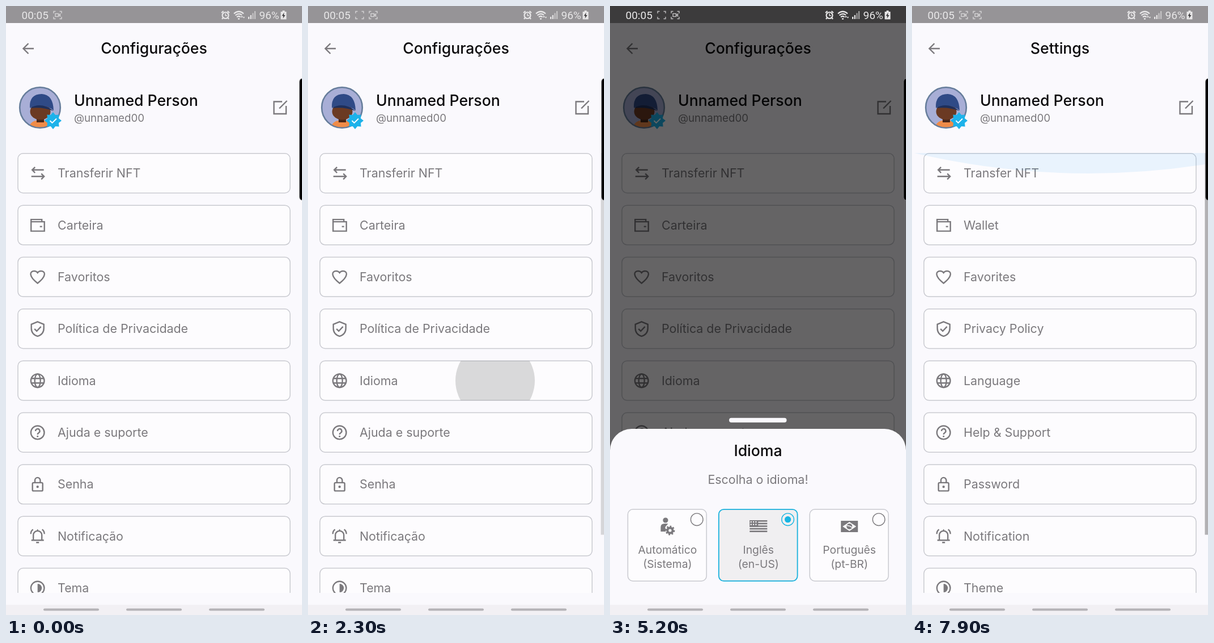
These frames come from a looping animation (522 by 1073 pixels, 8 s). An HTML page:

```html
<!DOCTYPE html>
<html lang="pt">
<head>
<meta charset="utf-8">
<title>Settings screen</title>
<style>
  html, body { margin: 0; width: 100%; height: 100%; overflow: hidden; background: #faf9fd; }
  svg { display: block; width: 100vw; height: 100vh; }
  text { font-family: Inter, "Open Sans", sans-serif; font-size: 21.4px; fill: #7b797d; }
  .title { font-size: 26.6px; font-weight: 500; fill: #0b0a0c; }
  .handle { font-size: 18.7px; }
  .small { font-size: 19.3px; }
  .mid { text-anchor: middle; }
  .line { fill: none; stroke: #7b797d; stroke-width: 2.4; }
  .solid { fill: #7b797d; stroke: none; }
  .box { fill: #fdfcfe; stroke: #c9cad0; stroke-width: 1.5; }
  .status text { font-family: Roboto, sans-serif; font-size: 19px; fill: #e8e7e8; }
  .status .thin { fill: none; stroke: #e8e7e8; stroke-width: 1.4; }
  .status .bold { fill: none; stroke: #e8e7e8; stroke-width: 2.2; }
  .status .full { fill: #e8e7e8; }
  .card circle { fill: none; stroke: #7b797d; stroke-width: 1.4; }
  .card .head { fill: #7b797d; stroke: none; }
  .card .dot { display: none; }
  .card.on .box { stroke: #18b5e2; stroke-width: 1.8; }
  .card.on .ring { stroke: #18b5e2; }
  .card.on .dot { display: block; fill: #18b5e2; stroke: none; }
  .pt .en, .en .pt { display: none; }
</style>
</head>
<body>
<script>
const LOOP = 8000, STEP = 100;
const VIEW = { top: 259, bottom: 1034, extra: 118 };
const PITCH = 91.35;

const ICONS = {
  transfer: '<path d="M11-6H-9M-4.5-11L-9.5-6L-4.5-1M-11 5.5H11M6.5.5L11.5 5.5L6.5 10.5"/>',
  wallet: '<path d="M7.5-6V-10H-11.5V10.5H12V-6H-11.5M4 2.5H8"/>',
  heart: '<path d="M0 11C-16.5-2-14-10.5-6-10.5C-3-10.5-1-9 0-7.5C1-9 3-10.5 6-10.5C14-10.5 16.5-2 0 11Z"/>',
  shield: '<path d="M0-12.5L11-8V-1C11 6 7 11 0 13C-7 11-11 6-11-1V-8ZM-5.5 0L-1.5 4L6-4"/>',
  globe: '<circle r="11.8"/><ellipse rx="5" ry="11.8"/><path d="M-11-4H11M-11 4H11"/>',
  help: '<circle r="11.8"/><path d="M-3.6-2.6a3.7 3.7 0 1 1 5.6 3c-1.4.9-2 1.5-2 3"/><circle class="solid" cy="6.6" r="1.5"/>',
  lock: '<rect x="-9" y="-3" width="18" height="14.5" rx="2"/><path d="M-4.7-3V-7.3a4.7 4.7 0 0 1 9.4 0V-3"/><circle class="solid" cy="4.2" r="2.2"/>',
  bell: '<path d="M-7.5 7V-2a7.5 7.5 0 0 1 15 0V7M-11 7H11M-2.5 11H2.5M0-12V-9M-12-4C-12-7-11-10-8-12M12-4C12-7 11-10 8-12"/>',
  theme: '<circle r="11.8"/><path class="solid" d="M0-7.5a7.5 7.5 0 0 1 0 15z"/>',
  logout: '<path d="M6-7V-11.5H-9V11.5H6V7M-2 0H12M8-4.5L12.5 0L8 4.5"/>'
};

const ITEMS = [
  ['transfer', 'Transferir NFT', 'Transfer NFT'],
  ['wallet', 'Carteira', 'Wallet'],
  ['heart', 'Favoritos', 'Favorites'],
  ['shield', 'Política de Privacidade', 'Privacy Policy'],
  ['globe', 'Idioma', 'Language'],
  ['help', 'Ajuda e suporte', 'Help &amp; Support'],
  ['lock', 'Senha', 'Password'],
  ['bell', 'Notificação', 'Notification'],
  ['theme', 'Tema', 'Theme'],
  ['logout', 'Sair', 'Logout']
];

const stripes = [0, 1, 2, 3, 4].map(i => `<rect class="solid" x="-15.5" y="${-11 + i * 4.6}" width="31" height="2.6"/>`).join('');
const stars = [0, 1, 2, 3, 4, 5].map(i => `<circle style="fill:#fdfcfe;stroke:none" cx="${-13 + i % 3 * 4.3}" cy="${i < 3 ? -8 : -3.5}" r="1.2"/>`).join('');
const CARDS = [
  ['Automático', 'Automatic', '(Sistema)', '(System)',
    `<circle class="head" cx="-3.5" cy="-11" r="4.6"/><path class="solid" d="M-12 9V1Q-12-5-5-5H1L-4 1L-3 9Z"/>
     <g transform="translate(4.5 7)"><circle style="stroke-width:4" r="4.6"/><circle style="stroke-width:3;stroke-dasharray:2.7" r="7"/></g>`],
  ['Inglês', 'English', '(en-US)', '(en-US)',
    `${stripes}<rect class="solid" x="-15.5" y="-11" width="15" height="11.800"/>${stars}`],
  ['Português', 'Portuguese', '(pt-BR)', '(pt-BR)',
    `<rect class="solid" x="-15" y="-10" width="30" height="20"/><path fill="#fdfcfe" d="M0-8L12 0L0 8L-12 0Z"/>
     <circle class="head" r="5"/><path d="M-4.5-1.5Q1-1.5 4.5 2" fill="none" stroke="#fdfcfe" stroke-width="1.4"/>`]
];

const label = (x, y, pt, en, cls = '') =>
  `<text x="${x}" y="${y}" class="pt ${cls}">${pt}</text><text x="${x}" y="${y}" class="en ${cls}">${en}</text>`;

const item = ([icon, pt, en], i) => `
  <g transform="translate(0 ${VIEW.top + 0.8 + i * PITCH})">
    <rect class="box" x="21" width="480" height="69.6" rx="9"/>
    <g clip-path="url(#itemClip)"><circle id="press${i}" cy="35" r="0"/></g>
    <g class="line" transform="translate(55.7 35)">${ICONS[icon]}</g>
    ${label(91, 42.5, pt, en)}
  </g>`;

const card = ([pt, en, pt2, en2, icon], i) => `
  <g class="card" id="card${i}" transform="translate(${31.4 + i * 160.4} 886.8)">
    <rect class="box" width="138.8" height="126.4" rx="9"/>
    <rect id="tint${i}" width="138.8" height="126.4" rx="9" opacity="0"/>
    <g transform="translate(70 30.2)">${icon}</g>
    <circle class="ring" cx="121.8" cy="17.9" r="10.8"/><circle class="dot" cx="121.8" cy="17.9" r="5.6"/>
    ${label(70, 78.2, pt, en, 'small mid')}${label(70, 103.2, pt2, en2, 'small mid')}
  </g>`;

const badge = Array.from({ length: 16 }, (_, i) => {
  const r = i % 2 ? 10.8 : 15, a = i * Math.PI / 8;
  return `${(83 + r * Math.cos(a)).toFixed(1)},${(202 + r * Math.sin(a)).toFixed(1)}`;
}).join(' ');

const recorder = (x, id) => `
  <g id="${id}" transform="translate(${x} 16)" opacity=".75">
    <path class="thin" d="M-7-3V-6.5H-3.500M3.500-6.5H7V-3M7 3V6.5H3.500M-3.500 6.5H-7V3"/>
    <path class="thin cam" d="M-4-2.5H1.5V2.5H-4ZM1.5 0L4.5-2V2Z"/>
  </g>`;

const avatar = `
  <g clip-path="url(#avatarClip)">
    <rect x="22" y="141" width="76" height="76" fill="#a8aed6"/>
    <path d="M40 220Q40 201 60 201Q80 201 80 220Z" fill="#f08c48"/>
    <rect x="54" y="196" width="13" height="9" fill="#4a2718"/>
    <ellipse cx="60.500" cy="186" rx="18" ry="14.500" fill="#6b3a23"/>
    <path d="M42 179Q41 155 63 155Q83 156 84 184Q68 171 42 179Z" fill="#2f4a86"/>
    <path d="M42 180Q62 168 84 185Q64 177 42 180Z" fill="#1d2f5c"/>
  </g>
  <circle cx="60" cy="179" r="35.800" fill="none" stroke="#667d9b" stroke-width="2.6"/>
  <polygon points="${badge}" fill="#1db2ea"/>
  <path d="M77.5 202L81.5 206L89 198.5" fill="none" stroke="#fff" stroke-width="1.8"/>`;

document.body.innerHTML = `
<svg id="stage" class="pt" viewBox="0 0 522 1073" preserveAspectRatio="none">
  <defs>
    <clipPath id="listClip"><rect y="${VIEW.top}" width="522" height="${VIEW.bottom - VIEW.top}"/></clipPath>
    <clipPath id="itemClip"><rect x="21" width="480" height="69.6" rx="9"/></clipPath>
    <clipPath id="avatarClip"><circle cx="60" cy="179" r="36"/></clipPath>
  </defs>
  <rect width="522" height="1073" fill="#faf9fd"/>
  <rect width="522" height="30" fill="#969497"/>
  <path class="line" d="M49 75H31M39.5 66L30.5 75L39.5 84"/>
  ${label(261, 83.5, 'Configurações', 'Settings', 'title mid')}
  ${avatar}
  <text class="title" x="120" y="176">Unnamed Person</text>
  <text class="handle" x="120" y="204">@unnamed00</text>
  <path class="line" d="M487 168.5H472.5V190H494V176M482 180.5L495.5 167"/>
  <g clip-path="url(#listClip)">
    <g id="list">${ITEMS.map(item).join('')}</g>
    <path id="glowTop" fill="#2196f3"/><path id="glowBottom" fill="#2196f3"/>
    <rect id="bar" x="516.5" width="6" fill="#b2b1b4"/>
  </g>
  <rect id="dim" width="522" height="1055" opacity="0"/>
  <g id="sheet">
    <rect x="210" y="725.7" width="101.5" height="8" rx="4" fill="#f9f8fc"/>
    <path d="M0 1055V783A38 38 0 0 1 38 745H484A38 38 0 0 1 522 783V1055Z" fill="#faf9fd"/>
    ${label(261, 793, 'Idioma', 'Language', 'title mid')}
    ${label(261, 842, 'Escolha o idioma!', 'Choose language!', 'mid')}
    ${CARDS.map(card).join('')}
  </g>
  <g class="status">
    <text x="27.5" y="23">00:05</text>
    ${recorder(91, 'rec1')}${recorder(115, 'rec2')}
    <circle class="bold" cx="387" cy="16.5" r="5.5"/>
    <path class="thin" d="M387 13V17H390"/>
    <path class="bold" d="M380 12L383.5 9M394 12L390.5 9M382.5 21L381 23M391.5 21L393 23"/>
    <path class="bold" d="M402 13.5Q410.5 6 419 13.5M404.5 16.5Q410.5 11.5 416 16M407 19.5Q410.5 16.5 413.5 19.5"/>
    <path class="full" d="M409 21.5a1.7 1.7 0 1 0 3 0zM414 20l2-3 2 3zM418 19l1.5 3 1.5-3z"/>
    <path class="full" d="M427 19h2.2v4H427zM430.7 16h2.2v7h-2.2z"/>
    <path class="full" opacity=".6" d="M434.4 12.5h2.2V23h-2.2zM438 9h2.2v14H438z"/>
    <text x="446.5" y="23">96%</text>
    <path class="full" d="M487.5 8h4v2h3v13.5h-10V10h3z"/>
    <path d="M490.5 11.5L486.5 17.5H489L488.5 22L492.5 16H490Z" fill="#3c3b3d"/>
  </g>
  <path d="M523 128H521Q517.5 129 517.5 134V336Q517.5 341 521 342H523Z" stroke="#8b898d" stroke-width=".8"/>
  <rect y="1055" width="522" height="18" fill="#f2f0f4"/>
  ${[66, 212, 358].map(x => `<rect x="${x}" y="1061.5" width="98" height="4" rx="2" fill="#b5b3b7"/>`).join('')}
</svg>`;

// Each track is a list of [time, value] keys joined by straight lines.
const TRACKS = {
  scroll: [[1000, 0], [1100, 22], [1400, 118], [1600, 118], [1700, 66], [1900, 0], [6700, 0], [7000, 118], [7200, 118], [7300, 105], [7700, 0]],
  bar: [[900, 0], [1000, 1], [2200, 1], [2400, 0], [6600, 0], [6700, 1]],
  bottomDepth: [[1400, 0], [1500, 22], [1600, 25], [1700, 9], [1800, 0], [6900, 0], [7000, 30], [7100, 41], [7200, 18], [7300, 0]],
  bottomHalf: [[1600, 220], [1700, 128], [6900, 310]],
  bottomAlpha: [[1700, .13], [6900, .08], [7100, .045]],
  topDepth: [[1800, 0], [1900, 22], [2100, 0], [7600, 0], [7700, 22], [7900, 36]],
  ripple: [[2200, 0], [2300, 70], [2600, 285]],
  password: [[7000, 0], [7100, .13], [7200, .13], [7300, 0]],
  english: [[4900, 0], [5100, .05], [5400, .05], [5700, 0]]
};

function value(name, t) {
  const keys = TRACKS[name];
  const next = keys.findIndex(k => k[0] > t);
  if (next === 0) return keys[0][1];
  if (next < 0) return keys[keys.length - 1][1];
  const [t0, a] = keys[next - 1], [t1, b] = keys[next];
  return a + (b - a) * (t - t0) / (t1 - t0);
}

const $ = id => document.getElementById(id);
const set = (id, attrs) => Object.entries(attrs).forEach(([k, v]) => $(id).setAttribute(k, v));
const show = (el, on) => { el.style.display = on ? '' : 'none'; };

function glow(id, cx, y, half, depth, alpha) {
  set(id, { d: `M${cx - half} ${y}Q${cx} ${y + 2 * depth} ${cx + half} ${y}Z`, opacity: alpha });
}

function render(t) {
  const at = name => value(name, t);
  const scroll = at('scroll'), height = VIEW.bottom - VIEW.top;
  const ratio = height / (height + VIEW.extra);

  set('stage', { class: t < 5300 ? 'pt' : 'en' });
  set('list', { transform: `translate(0 ${-scroll})` });
  set('bar', { y: VIEW.top + scroll * ratio, height: height * ratio, opacity: at('bar') });
  glow('glowBottom', 350, VIEW.bottom, at('bottomHalf'), -at('bottomDepth'), at('bottomAlpha'));
  glow('glowTop', 312, VIEW.top, 308, at('topDepth'), .085);

  set('press4', { cx: 330, r: t < 2700 ? at('ripple') : 0, opacity: .14 });
  set('press6', { cx: 261, r: 260, opacity: at('password') });

  set('dim', { opacity: t >= 2600 && t < 6400 ? .6 : t === 6400 ? .25 : 0 });
  show($('sheet'), t >= 2700 && t < 6600);
  $('card0').classList.toggle('on', t < 5100);
  $('card1').classList.toggle('on', t >= 5100);
  set('tint1', { opacity: at('english') });

  const phase = t % 1000;
  show($('rec1').querySelector('.cam'), phase < 100 || phase >= 500);
  show($('rec2'), t >= 400);
}

const start = performance.now();
function frame() {
  const t = (performance.now() - start) % LOOP;
  render(Math.floor(t / STEP) * STEP);
  requestAnimationFrame(frame);
}
frame();
</script>
</body>
</html>
```
